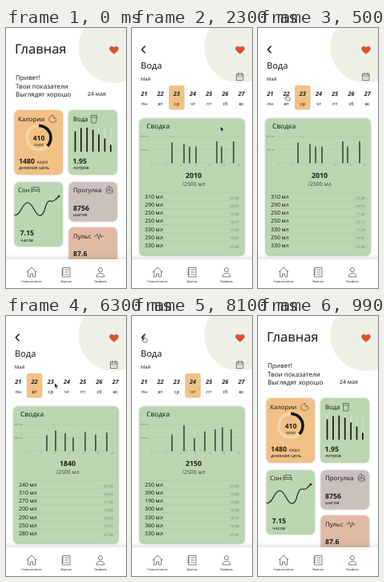
Recreate the animation shown at these times as an HTML page. Size 150 by 326 pixels, loop 10 s.

```html
<!DOCTYPE html>
<html lang="ru">
<head>
<meta charset="utf-8">
<style>
  html, body { margin: 0; width: 100%; height: 100%; overflow: hidden; background: #fff; }
  svg { display: block; width: 100%; height: 100%; }
  text { font-family: "Noto Sans", "Open Sans", sans-serif; fill: #1c1c1c; text-rendering: geometricPrecision; }
  .bold { font-weight: 600; }
  .soft { fill: #4a4a46; }
  .faint { fill: #71836c; }
  .line { fill: none; stroke: #3c3c3c; stroke-width: .65; stroke-linecap: round; stroke-linejoin: round; }
  .card { filter: drop-shadow(0 .8px 1.2px rgba(0, 0, 0, .25)); }
  .nav { fill: #fff; filter: drop-shadow(0 -2px 3px rgba(0, 0, 0, .13)); }
</style>
</head>
<body>
<svg viewBox="0 0 150 326" id="stage"></svg>
<script>
const LOOP = 10000, STEP = 100;
const GREEN = '#bbd6b1', ORANGE = '#f1c186', INK = '#151515';

const text = (x, y, size, value, cls = '', anchor = 'start') =>
  `<text x="${x}" y="${y}" font-size="${size}" class="${cls}" text-anchor="${anchor}">${value}</text>`;
const card = (x, y, w, h, color) =>
  `<rect class="card" x="${x}" y="${y}" width="${w}" height="${h}" rx="6" fill="${color}"/>`;
const icon = (x, y, d) => `<path class="line" transform="translate(${x} ${y})" d="${d}"/>`;
const bar = (x, top, bottom, w, color = INK) =>
  `<path d="M${x} ${top}V${bottom}" stroke="${color}" stroke-width="${w}" stroke-linecap="round"/>`;

const header = `
  <rect width="150" height="326" fill="#fff"/>
  <circle cx="135" cy="24.5" r="44.5" fill="#eef0e6"/>
  <path d="M135 32.3C132.5 30.2 129.6 28.2 129.6 25.7C129.6 22.8 133.5 22.2 135 24.9
    C136.5 22.2 140.4 22.8 140.4 25.7C140.4 28.2 137.5 30.2 135 32.3Z" fill="#ea4a32" stroke="#67382f" stroke-width=".5"/>`;

const home = () => {
  const tops = [130, 126, 125.5, 128, 134, 139, 147];
  const ring = 2 * Math.PI * 15;
  return text(11, 32, 16.4, 'Главная')
    + text(12, 65, 8, 'Привет!') + text(12, 75.5, 8, 'Твои показатели')
    + text(12, 86, 8, 'Выглядят хорошо') + text(102, 84.5, 7, '24 мая')

    + card(10.5, 103, 60.5, 81, ORANGE) + text(15, 117, 7.8, 'Калории')
    + icon(58, 114, 'M1-4.5C-3-4-5-1-4 2C-3 5 2 5.5 4.5 2.5M1-4.5C0-2 2-2 2 0C3-1 3-2 3-2C5 0 5 1 4.5 2.5')
    + `<circle cx="41" cy="137.5" r="15" fill="none" stroke="#f6d5a8" stroke-width="3.6"/>
       <circle cx="41" cy="137.5" r="15" fill="none" stroke="${INK}" stroke-width="3.6"
         stroke-dasharray="${ring * .37} ${ring}" transform="rotate(-90 41 137.5)"/>`
    + text(41, 140.5, 8.5, '410', 'bold', 'middle') + text(41, 147.5, 5.3, 'ккал', '', 'middle')
    + text(16, 170, 8.7, '1480', 'bold') + text(39, 170, 6, 'ккал') + text(16, 177, 5.7, 'дневная цель')

    + card(78, 103, 61, 81, GREEN) + text(84, 117, 7.8, 'Вода')
    + icon(110, 114, 'M-3.5-4.5H3.5L2.7 5H-2.7ZM-3.2-2H3.2')
    + tops.map((top, i) => {
      const x = 86.5 + i * 7.4;
      return bar(x, 126, 154.5, 1.7, '#cbe0c4') + bar(x, top, 154.5, 1.7);
    }).join('')
    + text(83.5, 170, 8.7, '1.95', 'bold') + text(84, 177, 5.7, 'литров')

    + card(10.5, 193.5, 60.5, 80.5, GREEN) + text(15, 206, 7.8, 'Сон')
    + icon(37, 202.5, 'M-5-3V4M-5 2H5V4M5 2V0H-5M-3-1V-3H4V0')
    + `<path class="line" style="stroke:${INK};stroke-width:1.1" d="M11 234.5C19 235 20 219 27 219
       C34 219 36 235 42 235C50 235 48 218 54 217C57 216.5 59 219 62 215L66 211"/>
       <circle cx="66" cy="211" r="1.3" fill="${INK}"/>`
    + text(17.5, 260, 8.7, '7.15', 'bold') + text(18, 267.5, 5.7, 'часов')

    + card(78.5, 193.5, 60.5, 49, '#cbc0bb') + text(84, 206, 7.8, 'Прогулка')
    + icon(129, 202, 'M-3 4C-5 1-3-2-1-4L1-3L0 0L4 3C5 4 4 5 3 5H-2ZM1-3L4-1L4 3M-2 0H0M-3 2H1')
    + text(84, 228.5, 8.7, '8756', 'bold') + text(84, 235.5, 5.7, 'шагов')

    + card(78.5, 250, 60.5, 49, '#e1baa6') + text(84, 264, 7.8, 'Пульс')
    + icon(116, 261, 'M-5 0H-3.5L-2-3L0 4L1.8-2.5L3 1.5L4 0H5.5')
    + text(84, 286, 8.7, '87.6', 'bold');
};

const days = {
  22: {
    amounts: [240, 310, 270, 200, 290, 250, 280], bars: [51, 62, 74, 84, 99, 112, 126],
    times: ['07:45', '09:40', '11:55', '13:48', '16:32', '18:57', '21:36']
  },
  23: {
    amounts: [310, 290, 250, 250, 330, 250, 330], bars: [50, 65, 72, 80, 106, 112, 127],
    times: ['07:38', '09:57', '11:42', '13:17', '17:29', '19:51', '21:43']
  },
  24: {
    amounts: [250, 390, 190, 300, 330, 360, 330], bars: [50, 65, 78, 91, 104, 113, 124],
    times: ['07:24', '10:09', '13:05', '15:38', '18:11', '19:44', '21:51']
  }
};

const water = selected => {
  const { amounts, bars, times } = days[selected];
  const total = amounts.reduce((a, b) => a + b);
  const dayX = i => 15.3 + i * 20.25;
  let out = `<path class="line" style="stroke:${INK};stroke-width:1.5" d="M16 23L12.3 27L16 31"/>`
    + text(11, 51, 11, 'Вода') + text(11, 66, 5.8, 'Май')
    + icon(135, 61, 'M-4-3.5H4V4.5H-4ZM-4-1H4M-2-5V-2.5M2-5V-2.5M-2 1.5H-1.8M0 1.5H.2M2 1.5H2.2')
    + `<rect x="${dayX(selected - 21) - 9.8}" y="72" width="19.6" height="30.5" rx="3" fill="${ORANGE}"/>`;
  ['пн', 'вт', 'ср', 'чт', 'пт', 'сб', 'вс'].forEach((name, i) => {
    out += `<g font-style="italic">${text(dayX(i), 85, 7.3, 21 + i, 'bold', 'middle')}</g>`
      + text(dayX(i), 97, 5.8, name, '', 'middle');
  });
  out += card(9, 113.5, 132, 172, GREEN) + text(18, 126, 8.4, 'Сводка');
  [136, 152.5, 169].forEach((y, i) => {
    out += `<path d="M23 ${y}H135" stroke="#a5c09b" stroke-width=".4"/>`;
    if (i < 2) out += text(10.5, y + 1, 3.2, ['400 мл', '200 мл'][i], 'faint');
  });
  for (let i = 0; i < 7; i++) {
    const y = 214 + i * 10.15;
    out += text(25 + i * 18, 172.7, 2.8, i * 4, 'faint', 'middle')
      + bar(bars[i], 169 - amounts[i] * .08, 169, 1.2)
      + `<path d="M16 ${y - 7.8}H134" stroke="#a2bd98" stroke-width=".35"/>`
      + text(16, y, 6.9, amounts[i] + ' мл')
      + text(134, y + .7, 4.6, times[i], 'faint', 'end');
  }
  return out + text(77, 188, 8.8, total, 'bold', 'middle') + text(77, 198, 6.9, '/2500 мл', 'soft', 'middle');
};

const nav = '<rect class="nav" x="-5" y="290" width="160" height="45"/>'
  + icon(32, 306, 'M-6 0L0-6L6 0M-4.5-1V6H-1.5V2H1.5V6H4.5V-1')
  + icon(75, 306, 'M-4-5.5H5V6H-4ZM-5.5-3H-3M-5.5 0H-3M-5.5 3H-3M-1-3H3M-1 0H3M-1 3H3')
  + icon(118, 306, 'M-2.6-2.8A2.6 2.6 0 1 1 2.6-2.8A2.6 2.6 0 1 1-2.6-2.8M-5 5.5C-5 0 5 0 5 5.5Z')
  + text(32, 318.7, 3.6, 'Главное меню', '', 'middle')
  + text(75, 318.7, 3.6, 'Журнал', '', 'middle')
  + text(118, 318.7, 3.6, 'Профиль', '', 'middle');

const cursors = {
  arrow: `<path d="M0 0V6.2L1.5 4.9L2.5 7.2L3.6 6.7L2.6 4.5H4.5Z" fill="#111" stroke="#fff" stroke-width=".5"/>`,
  hand: `<path d="M-.6 .2C-.6-.8 .7-.8 .7 .2V2.3L3.6 3C4.2 3.2 4.2 4 4 5L3.5 7H-.4L-2.3 4.3
    C-2.6 3.4-1.6 3.2-.6 4.2Z" fill="#fff" stroke="#222" stroke-width=".6" stroke-linejoin="round"/>`
};

const screens = { home: home(), 22: water(22), 23: water(23), 24: water(24) };
const group = (id, body) => `<g id="${id}">${body}</g>`;
const stage = document.getElementById('stage');
stage.innerHTML = header
  + Object.entries(screens).map(([id, body]) => group('screen-' + id, body)).join('')
  + nav + Object.entries(cursors).map(([id, body]) => group(id, body)).join('');

const show = (id, on) => document.getElementById(id).style.display = on ? '' : 'none';

// [start time, value], each held until the next
const screenCues = [[0, 'home'], [1900, '23'], [5400, '22'], [7400, '24'], [8400, 'home']];
const cursorCues = [[0, ''], [1000, 'arrow'], [1200, 'hand'], [1900, 'arrow'], [4700, 'hand'],
  [5400, 'arrow'], [6500, 'hand'], [7400, 'arrow'], [8100, 'hand'], [8400, 'arrow'], [9000, '']];
const path = [[1000, 142, 170], [1700, 113, 125], [2200, 113, 125], [3000, 58, 87], [4200, 58, 87],
  [5000, 36, 84], [5900, 36, 84], [6600, 77, 84], [7000, 77, 84], [7100, 77, 83],
  [7500, 77, 83], [8100, 15, 26], [9000, 15, 26]];

const cueAt = (cues, t) => cues.filter(cue => cue[0] <= t).pop()[1];
const ease = p => p * p * (3 - 2 * p);

function pointAt(t) {
  const i = path.findIndex(point => point[0] > t);
  if (i === 0) return path[0].slice(1);
  if (i < 0) return path[path.length - 1].slice(1);
  const [t0, x0, y0] = path[i - 1], [t1, x1, y1] = path[i];
  const p = ease((t - t0) / (t1 - t0));
  return [x0 + (x1 - x0) * p, y0 + (y1 - y0) * p];
}

function draw(now) {
  const t = Math.floor(now % LOOP / STEP) * STEP;
  const screen = cueAt(screenCues, t), cursor = cueAt(cursorCues, t);
  for (const id in screens) show('screen-' + id, id === screen);
  for (const id in cursors) show(id, id === cursor);
  if (cursor) document.getElementById(cursor).setAttribute('transform', `translate(${pointAt(t)})`);
}

const start = performance.now();
function tick() {
  draw(performance.now() - start);
  requestAnimationFrame(tick);
}
tick();
</script>
</body>
</html>
```
